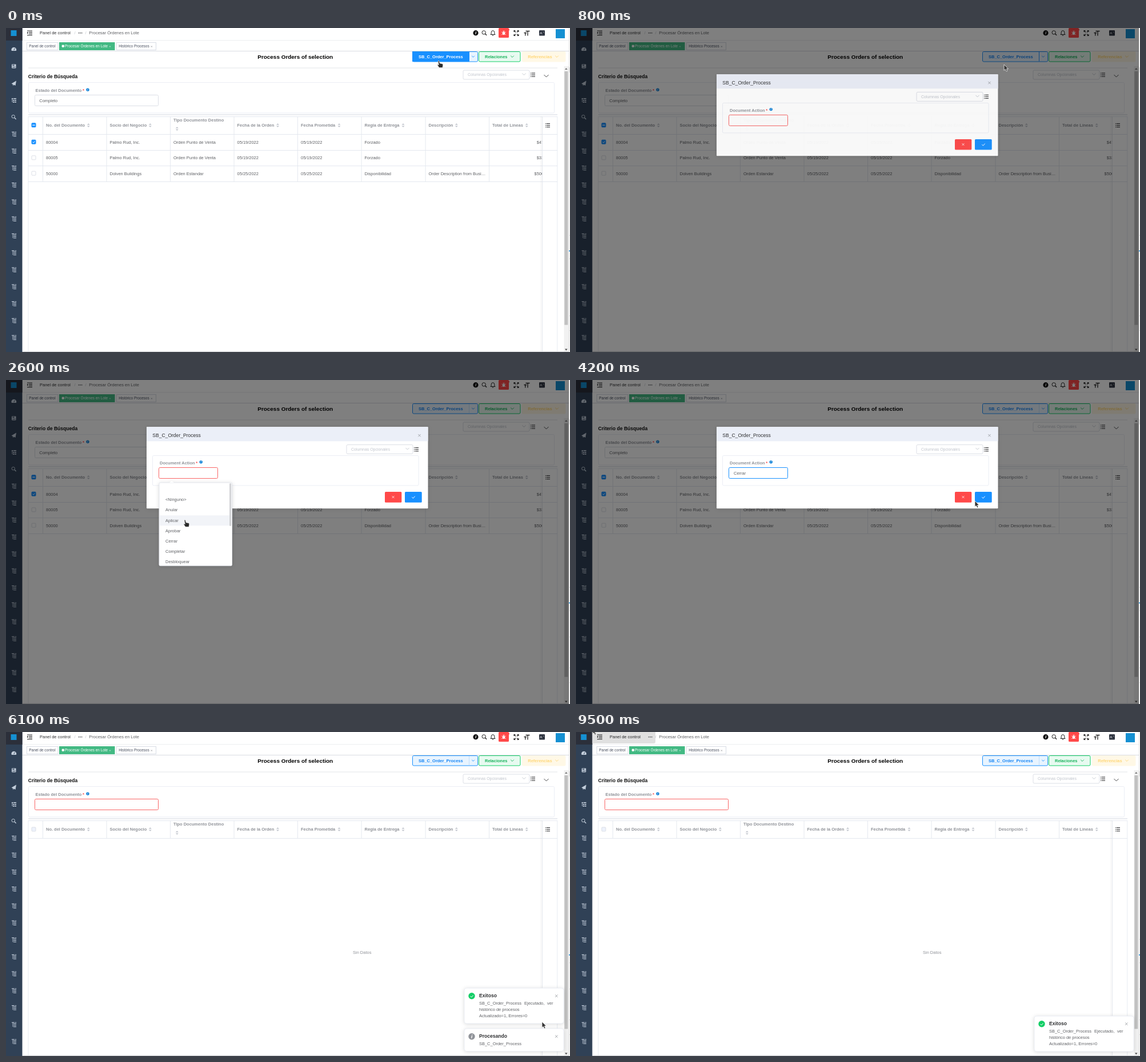
Animation, 987 px wide and 568 px high, one loop 9600 ms. Source, as an HTML page:

```html
<!DOCTYPE html>
<html lang="es">
<head>
<meta charset="utf-8">
<title>Process Orders</title>
<style>
html, body { margin: 0; width: 100%; height: 100%; overflow: hidden; background: #fff; }
svg { display: block; width: 987px; height: 568px; font-family: "Liberation Sans", Arial, sans-serif; }
.card { filter: drop-shadow(0 1px 3px rgba(0,0,0,.14)); }
</style>
</head>
<body>
<svg id="stage" viewBox="0 0 987 568"></svg>
<script>
const BLUE = '#1890ff', RED = '#ff4949', GREEN = '#13ce66', GREY = '#909399', INK = '#606266',
      LINE = '#e1e6ee', EDGE = '#dcdfe6', PALE = '#c0c4cc', DARK = '#303133';

// y of a text is the middle of its line
const text = (x, y, s, fill = INK, size = 7.47, bold = false) =>
  `<text x="${x}" y="${y + size * .35}" font-size="${size}" fill="${fill}"${bold ? ' font-weight="bold"' : ''}>${s}</text>`;
const bold = (x, y, s, fill = GREY, size = 7.47) => text(x, y, s, fill, size, true);
const rect = (x, y, w, h, fill, stroke = 'none', r = 0) =>
  `<rect x="${x}" y="${y}" width="${w}" height="${h}" rx="${r}" fill="${fill}" stroke="${stroke}"/>`;
const path = (d, stroke, width = 1, fill = 'none') =>
  `<path d="${d}" stroke="${stroke}" stroke-width="${width}" fill="${fill}"/>`;
const shape = (d, fill) => path(d, 'none', 0, fill);
const circle = (x, y, r, fill, stroke = 'none') => `<circle cx="${x}" cy="${y}" r="${r}" fill="${fill}" stroke="${stroke}"/>`;
const group = (id, body, attrs = '') => `<g id="${id}" ${attrs}>${body}</g>`;
const at = (x, y, body) => `<g transform="translate(${x} ${y})">${body}</g>`;

const down = (x, y, color, r = 3) => path(`M${x - r} ${y - r / 2}l${r} ${r}l${r} ${-r}`, color, .9);
const cross = (x, y, color, r = 2.2) => path(`M${x - r} ${y - r}l${2 * r} ${2 * r}m0 ${-2 * r}l${-2 * r} ${2 * r}`, color, .8);
const tick = (x, y, color, r = 2.5) => path(`M${x - r} ${y}l${r * .8} ${r * .8}l${r * 1.2} ${-r * 1.4}`, color, 1);
const info = (x, y, r, color) => circle(x, y, r, color) +
  `<text x="${x}" y="${y + r * .6}" font-size="${r * 1.7}" font-weight="bold" font-style="italic" fill="#fff" text-anchor="middle">i</text>`;
const list = (x, y, color = DARK) => [-3, 0, 3].map(d =>
  rect(x - 4, y + d - .5, 1.2, 1.2, color) + rect(x - 2, y + d - .5, 6, 1.1, color)).join('');
const sort = (x, y) => shape(`M${x - 2.5} ${y - .7}l2.5 -2.6l2.5 2.6zm0 1.6l2.5 2.6l2.5 -2.6z`, PALE);
const search = (x, y, color, r = 2.8) => circle(x - .8, y - .8, r, 'none', color) + path(`M${x + 1.3} ${y + 1.3}l2.8 2.8`, color, 1.4);
const picker = (x, y, w) => rect(x + .5, y + .5, w, 16, '#fff', EDGE, 2) +
  text(x + 8.5, y + 8.5, 'Columnas Opcionales', PALE, 6.95) + down(x + 107, y + 7.5, PALE) + list(x + 122.5, y + 8.5);
const checkbox = (y, mark) => rect(45, y - 3.5, 7, 7, mark ? BLUE : '#fff', mark ? BLUE : EDGE, 1) +
  (mark === 'dash' ? rect(46.2, y - .6, 4.6, 1.2, '#fff') : mark ? tick(48.5, y, '#fff', 2) : '');

function sidebar() {
  const c = '#c3cedb';
  const tree = y => at(0, y, rect(10, -4.2, 5, 1.1, c) + rect(11.5, -3, .8, 7, c) +
    [-2, .6, 3.2].map(d => rect(13, d, 5, 1.1, c)).join('') + rect(16, -4.2, 2, 1.1, c));
  let s = rect(0, 0, 28.5, 568, '#304156') + rect(0, 0, 28.5, 22, '#2b2f3a') + rect(8.5, 4, 10, 10, '#1590d2');
  s += shape('M9.8 40a4.4 4.4 0 1 1 8 0z', c) + path('M13.8 39l1.6 -3.6', '#304156', .9);
  s += rect(10, 63.5, 7.5, 7, c, 'none', .8) + rect(11.3, 64.5, 3.5, 1.6, '#304156') + rect(11.3, 68, 5, 1, '#304156');
  s += shape('M9.5 97.5l8.5 -5l-1.5 8.5l-3 -1.4l-1.3 1.8l-.3 -2.7z', c);
  s += [-3, 0, 3].map((d, i) => rect(i ? 12 : 10, 126 + d, 2, 1.8, c) + rect(i ? 14.5 : 12.8, 126 + d, i ? 3.5 : 5.2, 1.6, c)).join('') + rect(10.5, 123, .8, 7, c);
  s += search(13.5, 156, c, 2.7);
  for (let i = 0; i < 13; i++) s += tree(186 + i * 29.72);
  return s;
}

const crumb = text(59, 8.5, 'Panel de control', DARK) +
  [0, 2.6, 5.2].map(d => circle(127.4 + d, 8.7, .9, INK)).join('');
const burger = [4.5, 7, 9.5, 12].map((y, i) => rect(i % 3 ? 40 : 37, y, i % 3 ? 6 : 9, 1.1, DARK)).join('') + shape('M37 6.5v4l2.3 -2z', DARK);

function navbar() {
  let s = burger + crumb + text(119.5, 8.5, '/', PALE) + text(138.5, 8.5, '/', PALE) + text(145.3, 8.5, 'Procesar Órdenes en Lote');
  s += info(822, 8.7, 4.6, '#111') + search(837, 8.7, '#222', 3.2);
  s += path('M848 11.5h8l-1.2 -1.5v-2.5a2.8 2.8 0 0 0 -5.6 0v2.5zM850.8 13h2.4', '#222', 1);
  s += rect(862, 0, 18, 17, RED, 'none', 1.5) + rect(869, 6.5, 4, 5.5, '#fff', 'none', 1.8) +
    path('M867.3 7l7.4 4.5m0 -4.5l-7.4 4.5M869.5 5.5h3', '#fff', .9) + circle(879, 3, 2, RED);
  s += path('M889 7v-2.5h2.5m3 0h2.500v2.500m0 4v2.500h-2.500m-3 0h-2.500v-2.500M889.500 5l2.500 2.500m4.500 -2.500l-2.500 2.500m2.500 5.500l-2.500 -2.500m-4.500 2.500l2.500 -2.500', '#222', 1.1);
  s += path('M909.5 5.500h7m-3.500 -.5v8.500M906.500 8.500h4.500m-2.200 0v5', '#222', 1.3);
  s += rect(933, 4, 10, 9.5, '#2e3440', 'none', 1) + text(934.3, 9, 'A', '#fff', 6.2) + text(939.5, 7, '+', '#fff', 4);
  s += rect(962, 2, 16, 16, '#1590d2') + rect(28.5, 21.5, 957, .7, '#e4e6ea');
  s += rect(36.5, 25.5, 54.5, 13, '#fff', '#d8dce5') + text(40.3, 32, 'Panel de control', '#495060', 6.42);
  s += rect(93.5, 25.5, 96.5, 13, '#42b983', '#42b983') + circle(99.8, 31.8, 2.3, '#fff') +
    text(103, 32, 'Procesar Órdenes en Lote', '#fff', 6.42) + cross(182, 32.5, '#cdeedd', 1);
  s += rect(193.5, 25.5, 69, 13, '#fff', '#d8dce5') + text(197.2, 32, 'Histórico Procesos', '#495060', 6.42) + cross(254.8, 32.5, GREY, 1);
  return s + rect(28.5, 40, 957, 1, '#d9dce2');
}

const action = (active) => active
  ? rect(711, 41, 99.500, 18, BLUE) + bold(722, 50, 'SB_C_Order_Process', '#fff')
  : bold(722, 50, 'SB_C_Order_Process', '#1283f5');

function header() {
  let s = bold(440.3, 50.8, 'Process Orders of selection', '#000', 9.93);
  s += rect(711.5, 41.5, 114, 17.5, '#e8f4ff', BLUE, 2) + rect(810, 42, .6, 16.500, '#a9d3fb') +
    group('focus', rect(810, 42, 1, 16.500, BLUE)) + group('idle', action(false)) + group('hover', action(true)) + down(817.5, 50, BLUE, 2.3);
  s += rect(827.5, 41.5, 72.500, 17.500, '#e7faf0', GREEN, 2) + bold(838, 50, 'Relaciones', '#18b25b') + down(886, 50, '#18b25b', 2.8);
  s += rect(903, 41, 76.500, 18.500, '#fff8e6', 'none', 2) + bold(913.3, 50, 'Referencias', '#ffd778') + down(964, 50, '#ffd778', 2.8);
  s += rect(39, 69.6, 926, .9, '#dfe1e6') + bold(38.8, 85, 'Criterio de Búsqueda', '#111', 8.55);
  s += picker(799.5, 73.5, 116) + down(945.5, 84, DARK, 4);
  s += rect(39.5, 95.5, 920, 53.5, 'none', '#ebeef5', 2) + bold(51.5, 109, 'Estado del Documento') +
    bold(134, 109.5, '*', RED) + info(143, 108.3, 2.7, '#1283d8');
  s += group('full', rect(50.5, 117.5, 216, 19, '#fff', EDGE, 2) + text(58.3, 127.3, 'Completo'));
  s += group('blank', rect(50.5, 117.5, 216, 19, '#fff', '#f96565', 2));
  return s + rect(39, 151, 926, 2, '#e9ebf0');
}

const COLS = [64.5, 176, 287.5, 399, 510.5, 622, 734, 845.5];
const HEADS = ['No. del Documento', 'Socio del Negocio', 'Tipo Documento Destino', 'Fecha de la Orden',
  'Fecha Prometida', 'Regla de Entrega', 'Descripción', 'Total de Líneas'];
const SORTS = [144.3, 252.3, 299.3, 475.5, 583, 695, 788.3, 911.2];
const ROWS = [
  ['80004', 'Palmo Rud, Inc.', 'Orden Punto de Venta', '05/19/2022', '05/19/2022', 'Forzado', '', '$47'],
  ['80005', 'Palmo Rud, Inc.', 'Orden Punto de Venta', '05/19/2022', '05/19/2022', 'Forzado', '', '$33'],
  ['50000', 'Dolven Buildings', 'Orden Estandar', '05/25/2022', '05/25/2022', 'Disponibilidad', 'Order Description from Busi…', '$500']
];

function table() {
  let s = rect(39, 155, 926, .9, LINE) + rect(39, 186, 926, .9, LINE) + rect(38.6, 155, .8, 413, LINE);
  COLS.forEach((x, i) => {
    const wraps = i === 2;
    s += rect(x - .4, 155, .9, 31, LINE) + bold(x + 5.5, wraps ? 161.8 : 170.5, HEADS[i]) + sort(SORTS[i], wraps ? 176.5 : 170.5);
  });
  let rows = checkbox(170.3, 'dash');
  ROWS.forEach((row, r) => {
    const y = [200, 227.7, 255][r];
    rows += rect(39, [214, 241.3, 269][r], 926, .9, LINE) + checkbox(y - .3, r === 0);
    row.forEach((s, i) => { rows += text(i < 7 ? COLS[i] + 5.5 : r < 2 ? 928.7 : 924.5, y, s); });
  });
  rows += COLS.map(x => rect(x - .4, 186, .9, 83, LINE)).join('');
  s += group('rows', rows);
  s += group('empty', rect(45, 167, 7, 7, '#edf2fc', EDGE, 1) + text(607, 386.7, 'Sin Datos', GREY));
  s += rect(935, 155, 3.5, 413, 'rgba(0,0,0,.025)') + rect(938.5, 155.9, 26, 412, '#fff') + rect(938, 155, .8, 413, '#dfe3ea') +
    rect(964.4, 155, .8, 413, LINE) + rect(938, 186, 27, .9, LINE) + list(948, 170.5);
  return s + group('rowEnds', [214, 241.3, 269].map(y => rect(938, y, 27, .9, LINE)).join(''));
}

const frame = rect(976.5, 67, 8.5, 501, '#f1f1f1') + rect(977.3, 76, 6, 444.5, '#c1c1c1') +
  shape('M978 73l2.300 -3l2.300 3z', '#777') + shape('M978 562.500l2.300 3l2.300 -3z', '#505050') +
  rect(28.5, 566.8, 957, 1.2, '#cfd1d4') + rect(985, 0, .8, 568, '#dadada') +
  rect(985.5, 69, 1.5, 9, '#ddd') + [363, 404, 450, 504, 530].map(y => rect(985.5, y, 1.5, 1, '#ddd')).join('') + rect(985, 390, 2, 1.5, '#1283d8');

const dialog = `<g class="card">${rect(246, 82.3, 492.5, 143, '#fff', 'none', 1)}</g>` +
  rect(246, 82.3, 492.5, 25, '#ebeff8') + text(256.3, 97.5, 'SB_C_Order_Process', DARK, 8.55) + cross(723.5, 97.2, GREY) +
  picker(595.5, 113, 116) + rect(256.5, 132.5, 465.5, 52.5, 'none', '#ebeef5', 2) +
  bold(269, 145.2, 'Document Action') + bold(332.3, 145.7, '*', RED) + info(341.2, 143.7, 2.7, '#1283d8') +
  group('unset', rect(267.5, 153.5, 103, 19, '#fff', '#f96565', 2)) +
  group('chosen', rect(267.5, 153.5, 103, 19, '#fff', BLUE, 2) + text(276, 163.3, 'Cerrar')) +
  rect(663, 196, 29.3, 18.7, RED, 'none', 1.5) + cross(677.5, 205.2, '#fff', 1.9) +
  rect(698, 196, 29.7, 18.7, BLUE, 'none', 1.5) + tick(713, 205.3, '#fff', 2.6);

const menu = `<g class="card">${rect(268, 180, 127.5, 145.7, '#fff', '#e4e7ed', 2)}${shape('M286 180l4 -3l4 3z', '#fff')}</g>` +
  group('mark', rect(268.5, 237.3, 122.5, 18, '#f2f4f8')) + rect(391, 181, 3.2, 75, '#d3d4d7', 'none', 1.6) +
  ['&lt;Ninguno&gt;', 'Anular', 'Aplicar', 'Aprobar', 'Cerrar', 'Completar', 'Desbloquear']
    .map((s, i) => text(279, 209.7 + i * 18.1, s)).join('');

const toast = (h, title, icon, body) => `<g class="card">${rect(802, 0, 174, h, '#fff', '#ebeef5', 4)}</g>` +
  icon + bold(828, 13, title, DARK, 8.55) + cross(963.3, 13.7, GREY) + body;
const done = toast(62, 'Exitoso', circle(815, 13.7, 5.7, GREEN) + tick(815, 14, '#fff', 2.5),
  text(828, 26.4, 'SB_C_Order_Process') + text(907, 26.4, 'Ejecutado,') + text(947, 26.4, 'ver') +
  text(828, 37.2, 'histórico de procesos') + text(828, 48.2, 'Actualizado=1, Errores=0'));
const busy = toast(39.5, 'Procesando', info(815, 13.7, 5.7, GREY), text(828, 26.4, 'SB_C_Order_Process'));

const arrow = path('M0 0v10.300l2.300 -2l1.800 3.700l1.900 -.900l-1.700 -3.500h3.200z', '#fff', .7, '#333');
const hand = path('M-2 .8q1 -1.500 2 0l1 4l4.500 1q1.500 .500 1.200 2.500l-.700 4.200h-6l-3 -4.500q0 -1.500 1.700 -.700l.7 .700z', '#fff', .6, '#2b2b2b');

stage.innerHTML = header() + table() + navbar() + frame + sidebar() +
  group('shade', rect(0, 0, 985, 568, '#000')) + group('dialog', dialog) + group('menu', menu) +
  group('busy', busy) + group('done', done) +
  group('ghost', shape('M28.500 0H139V17q0 3 -3 3H28.500z', 'rgba(220,220,220,.88)') + burger + crumb) +
  group('arrow', arrow) + group('hand', hand);

const $ = id => document.getElementById(id);
const show = (id, o) => $(id).setAttribute('opacity', +o);
const move = (id, x, y, more = '') => $(id).setAttribute('transform', `translate(${x} ${y}) ${more}`);
const clamp = v => Math.max(0, Math.min(1, v));

// pointer moves: first step, last step, x, y
const MOVES = [
  [700, 700, 759, 57], [800, 800, 749, 64], [900, 1300, 328, 164], [1500, 2400, 328, 240],
  [2500, 2500, 325, 228], [2600, 2600, 314, 245], [3200, 3200, 302, 280], [3500, 3500, 302, 269],
  [3700, 3700, 646, 231], [4200, 4200, 698, 212], [4700, 4700, 705, 204], [5300, 5300, 735, 330],
  [5600, 5700, 897, 485], [5900, 6100, 938, 508], [6400, 6400, 933, 508], [7000, 7000, 932, 512],
  [7300, 7300, 928, 519], [7500, 7500, 895, 541], [7700, 7700, 918, 547], [8000, 8000, 866, 531],
  [8200, 8200, 918, 529], [8300, 8300, 823, 530], [8600, 8600, 651, 437], [8800, 8900, 2, 34], [9200, 9200, 29, -7]
];

function pointer(t) {
  let x = 758, y = 57;
  for (const [a, b, nx, ny] of MOVES) {
    const k = clamp((t - a + 100) / (b - a + 100));
    x += (nx - x) * k;
    y += (ny - y) * k;
  }
  return [x, y];
}

function draw(now) {
  const t = Math.floor(now % 9600 / 100) * 100; // the screen refreshes every 100 ms
  const closing = t >= 4700, closed = t >= 5300, cleared = t >= 5600;

  show('hover', t < 600);
  show('idle', t >= 600);
  show('focus', t < 1500);

  const p = 1 - (1 - clamp((t - 570) / 300)) ** 2;
  show('shade', closed ? 0 : closing ? .25 : .5 * clamp((t - 560) / 200));
  show('dialog', closed ? 0 : closing ? .4 : p);
  move('dialog', 0, closing ? -8 : -20 * (1 - p));
  show('unset', t < 3500);
  show('chosen', t >= 3500);

  const open = t < 3500 ? clamp((t - 1500) / 300) : 0;
  show('menu', open);
  move('menu', 0, 180 * (1 - open), `scale(1 ${open})`);
  show('mark', t >= 2300);

  for (const id of ['full', 'rows', 'rowEnds']) show(id, !cleared);
  for (const id of ['blank', 'empty']) show(id, cleared);

  show('busy', !closed || t >= 6600 ? 0 : t >= 6400 ? .2 : 1);
  move('busy', 0, 520);
  show('done', cleared ? clamp((t - 5500) / 170) : 0);
  move('done', t === 5600 ? 8 : 0, t < 6400 ? 449 : t < 6600 ? 494.5 : 498);
  show('ghost', t < 9200 ? 0 : t < 9400 ? .5 : t < 9500 ? .8 : 1);

  const [x, y] = pointer(t);
  const pointing = t < 700 || t >= 1200 && t < 3700 || closing && !closed;
  show('hand', pointing);
  show('arrow', !pointing);
  move('hand', x, y);
  move('arrow', x, y);
}

const start = performance.now();
function loop() {
  draw(performance.now() - start);
  requestAnimationFrame(loop);
}
loop();
</script>
</body>
</html>
```
